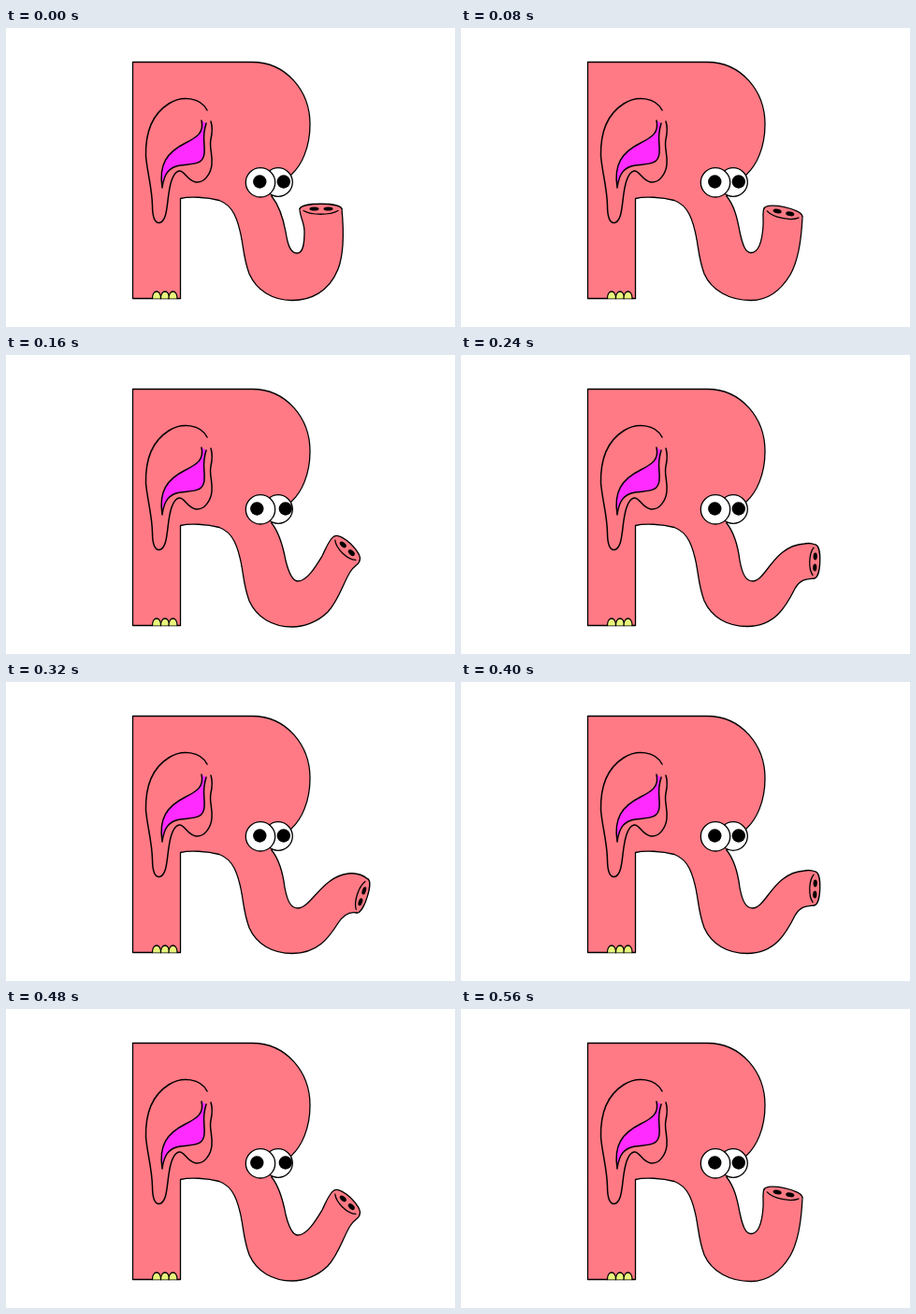
Recreate the animation shown at these times as an HTML page. Size 480 px wide and 320 px high, loop 0.64 s.

```html
<!DOCTYPE html>
<html lang="en">
<head>
<meta charset="utf-8">
<title>Elephant R</title>
<style>
  html, body { margin: 0; width: 100%; height: 100%; overflow: hidden; background: #fff; }
  svg { display: block; width: 100%; height: 100%; }
  .ink { stroke: #000; stroke-width: 1.3; stroke-linecap: round; stroke-linejoin: round; }
  .skin { fill: #ff7a85; }
  .line { fill: none; }
  .ear { stroke-width: 1.5; }
  .tip path { vector-effect: non-scaling-stroke; }

  /* The trunk swings through five held poses and back, 80 ms each. */
  .pose { visibility: hidden; animation: 640ms step-end infinite; }
  .curled { animation-name: curled; }
  .lifted { animation-name: lifted; }
  .slanted { animation-name: slanted; }
  .level { animation-name: level; }
  .stretched { animation-name: stretched; }
  @keyframes curled { 0% { visibility: visible } 12.5%, 100% { visibility: hidden } }
  @keyframes lifted { 0%, 25%, 100% { visibility: hidden } 12.5%, 87.5% { visibility: visible } }
  @keyframes slanted { 0%, 37.5%, 87.5%, 100% { visibility: hidden } 25%, 75% { visibility: visible } }
  @keyframes level { 0%, 50%, 75%, 100% { visibility: hidden } 37.5%, 62.5% { visibility: visible } }
  @keyframes stretched { 0%, 62.5%, 100% { visibility: hidden } 50% { visibility: visible } }

  .pupil { animation: glance 640ms step-end infinite; }
  @keyframes glance {
    0%, 37.5%, 87.5%, 100% { transform: none }
    25%, 75% { transform: translateX(var(--shift)) }
  }
</style>
</head>
<body>
<svg viewBox="0 0 480 320">
  <defs>
    <g id="tip" class="tip">
      <path class="ink skin" d="M-22.5 0C-20 -7 20 -7 22.5 0"/>
      <path class="ink line" d="M-18.500 2C-10 7 10 7 18.500 2"/>
      <ellipse cx="-7" rx="5" ry="2.100"/>
      <ellipse cx="8" rx="5" ry="2.100"/>
    </g>
    <path id="nail" class="ink" fill="#e9f67c" d="M-4.500 289.500C-4.500 279.500 4.500 279.500 4.500 289.500"/>
  </defs>

  <path class="ink skin" d="M252 226C248 205 243 190 228 184.500C215 181 196 180 186.500 182.500V289.500H135.500V36.500H262C300 36 325 68 325 103C325 128 316 147 305 157L284 180"/>

  <g class="pose curled">
    <path class="ink skin" d="M284 180C292 190 296 202 299 218C301 232 304 241 311 241C318 241 319 230 319 218C319 208 314 202 314 193.500H359C361 215 362 240 355 258C345 283 325 291.500 306 291.500C285 291.500 268 281 260 263C255 250 254 238 252 226"/>
    <path class="skin" d="M314.700 192H358.300V196H314.700Z"/>
    <use href="#tip" transform="translate(336.500 193.500)"/>
  </g>
  <g class="pose lifted">
    <path class="ink skin" d="M284 180C292 190 295 202 298 218C301 232 304 240.500 310 240.500C319 240.500 322 226 323 212C323.500 203 322 198 324 193L365 202C364 225 360 250 352 264C340 284 325 291.500 310 291.500C287 291.500 268 281 260 263C255 250 254 238 252 226"/>
    <path class="skin" d="M325 192L364.300 200.500V204L324.500 195.500Z"/>
    <use href="#tip" transform="translate(344.500 197.300) rotate(12) scale(.93 1.1)"/>
  </g>
  <g class="pose slanted">
    <path class="ink skin" d="M284 180C292 190 296 204 299 220C303 236 307 242 312 242C322 242 332 225 338 215C342 207 346 196 351 194L378 220C378 224 372 225 368 232C360 245 356 262 344 275C333 286 318 291 306 291C285 291 268 281 260 263C255 250 254 238 252 226"/>
    <path class="skin" d="M352 193L378 218L376.500 220.500L350.500 196Z"/>
    <use href="#tip" transform="translate(364.500 207) rotate(44) scale(.83 1.2)"/>
  </g>
  <g class="pose level">
    <path class="ink skin" d="M284 180C292 190 296 204 298 220C301 236 305 242 312 242C326 242 334 204 367 202C371 201 375 201.500 379 203L378 239C372 240 364 238 357 250C348 268 336 290.500 306 290.500C285 290.500 268 281 260 263C255 250 254 238 252 226"/>
    <path class="skin" d="M377 203.500H380.500L379.500 238.300H376Z"/>
    <use href="#tip" transform="translate(378.500 221) rotate(92) scale(.8 1)"/>
  </g>
  <g class="pose stretched">
    <path class="ink skin" d="M284 180C292 190 296 204 298 220C301 236 305 242 312 242C326 242 338 208 366 205C374 204 382 207 387 211L375 247C367 245 361 249 355 258C345 274 333 290.500 306 290.500C285 290.500 268 281 260 263C255 250 254 238 252 226"/>
    <path class="skin" d="M385 211L388 212.500L376.500 246.500L373.500 245.500Z"/>
    <use href="#tip" transform="translate(381 229) rotate(108) scale(.85 1)"/>
  </g>
  <path d="M281.500 183.500L254 223" stroke="#ff7a85" stroke-width="3"/>

  <path class="ink line ear" d="M215 88C208 74 188 72 174 81C155 93 149 115 149.500 137C151 155 156 170 156.500 190C156.500 202 159 209 164 208.500C172 207 172 190 174 177C176 163 180 154 185 153C191 152 193 163 203 165C212 166 219 156 220 146C221 134 217 128 219 119C220.500 112 221 106 219 100"/>
  <path fill="#ff2bff" d="M209 99C212 112 204 117 192 123C172 133 163 146 167 171C169 156 174 149 186 147C199 145 211 147 212 134C213 122 209 118 214 102Z"/>
  <path class="ink line ear" d="M209 99C212 112 204 117 192 123C172 133 163 146 167 171C169 156 174 149 186 147C199 145 211 147 212 134C213 122 209 118 214 102"/>

  <use href="#nail" x="161"/>
  <use href="#nail" x="170"/>
  <use href="#nail" x="178.500"/>

  <circle class="ink" cx="291" cy="165" r="15.300" fill="#fff"/>
  <circle class="pupil" style="--shift: 2px" cx="296.800" cy="164.500" r="7.200"/>
  <circle class="ink" cx="272" cy="165.300" r="15.700" fill="#fff"/>
  <circle class="pupil" style="--shift: -3px" cx="271.300" cy="164.500" r="7.200"/>
</svg>
</body>
</html>
```
